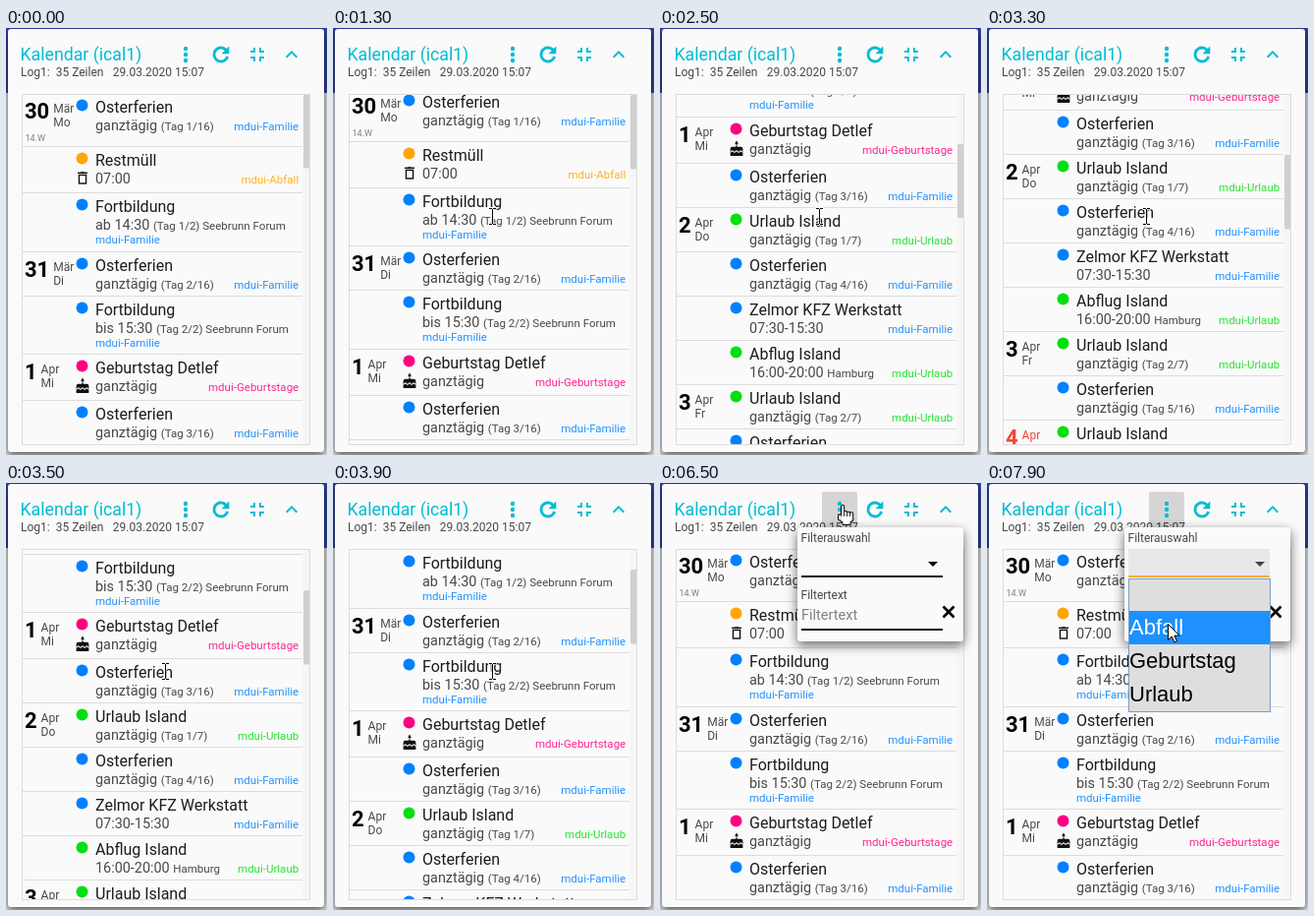
Write an HTML page with a canvas that moves like this. It is 327 px wide and 434 px high and loops after 8 s.

```html
<!DOCTYPE html>
<html lang="de">
<head>
<meta charset="utf-8">
<title>Kalendar</title>
<style>
html, body { margin: 0; width: 100%; height: 100%; overflow: hidden; }
canvas { display: block; width: 327px; height: 434px; }
</style>
</head>
<body>
<canvas id="stage"></canvas>
<script>
const W = 327, H = 434, LOOP = 8000, STEP = 100;
const canvas = document.getElementById('stage');
const ctx = canvas.getContext('2d');
const dpr = window.devicePixelRatio || 1;
canvas.width = W * dpr;
canvas.height = H * dpr;

const CYAN = '#00bcd4', INK = '#1c1c1c', SOFT = '#484848', LINE = '#dcdcdc', PAPER = '#fafafa';
const TAGS = { Familie: '#0080ff', Abfall: '#ffa500', Geburtstage: '#ff0080', Urlaub: '#00e010' };
const LIST = { x: 16, y: 67, w: 294, h: 357 };
const TWO_LINES = 45, WITH_ICON = 47, WITH_WEEK = 54, THREE_LINES = 59.5;

const entry = (title, time, note, tag, more = {}) => ({ title, time, note, tag, h: TWO_LINES, ...more });
const holiday = (n, more) => entry('Osterferien', 'ganztägig', `(Tag ${n}/16)`, 'Familie', more);
const trip = (n, more) => entry('Urlaub Island', 'ganztägig', `(Tag ${n}/7)`, 'Urlaub', more);
const course = (n, time) =>
  entry('Fortbildung', time, `(Tag ${n}/2) Seebrunn Forum`, 'Familie', { h: THREE_LINES, wide: true });

const rows = [
  holiday(1, { day: ['30', 'Mär', 'Mo'], week: '14.W', h: WITH_WEEK }),
  entry('Restmüll', '07:00', '', 'Abfall', { icon: drawBin, h: WITH_ICON }),
  course(1, 'ab 14:30'),
  holiday(2, { day: ['31', 'Mär', 'Di'] }),
  course(2, 'bis 15:30'),
  entry('Geburtstag Detlef', 'ganztägig', '', 'Geburtstage',
    { day: ['1', 'Apr', 'Mi'], icon: drawCake, h: WITH_ICON }),
  holiday(3),
  trip(1, { day: ['2', 'Apr', 'Do'] }),
  holiday(4),
  entry('Zelmor KFZ Werkstatt', '07:30-15:30', '', 'Familie'),
  entry('Abflug Island', '16:00-20:00', 'Hamburg', 'Urlaub'),
  trip(2, { day: ['3', 'Apr', 'Fr'] }),
  holiday(5),
  trip(3, { day: ['4', 'Apr', 'Sa'], red: true })
];

const ease = k => (1 - Math.cos(Math.PI * Math.min(1, Math.max(0, k)))) / 2;

// Every wheel notch scrolls by 100 px.
const DOWN = [1274, 1520, 2420], UP = [3274, 3674, 4320];
function scrollAt(t) {
  const turned = starts => starts.reduce((sum, s) => sum + ease((t - s) / 180), 0);
  return 100 * (turned(DOWN) - turned(UP));
}

const ENTRY = { x: 313, y: 72 };
const MOVES = [
  { from: 400, to: 600, x: 162, y: 191 },
  { from: 4900, to: 5000, x: 164, y: 190 },
  { from: 5000, to: 5700, x: 173, y: 22, bow: 70 },
  { from: 5800, to: 6000, x: 186, y: 22 },
  { from: 6500, to: 6900, x: 275, y: 78 },
  { from: 7400, to: 7900, x: 184, y: 143 }
];
function pointerAt(t) {
  let { x, y } = ENTRY;
  for (const m of MOVES) {
    const k = ease((t - m.from) / (m.to - m.from));
    x += (m.x - x) * k + (m.bow || 0) * Math.sin(Math.PI * k);
    y += (m.y - y) * k;
  }
  return { x: Math.round(x), y: Math.round(y) };
}

function text(str, x, y, size, color, { weight = 400, align = 'left', family = 'Roboto' } = {}) {
  ctx.font = `${weight} ${size}px ${family}, sans-serif`;
  ctx.textAlign = align;
  ctx.fillStyle = color;
  ctx.fillText(str, x, y);
  return ctx.measureText(str).width;
}

function rect(x, y, w, h, color) {
  ctx.fillStyle = color;
  ctx.fillRect(x, y, w, h);
}

function disc(x, y, r, color) {
  ctx.fillStyle = color;
  ctx.beginPath();
  ctx.arc(x, y, r, 0, Math.PI * 2);
  ctx.fill();
}

function panel(x, y, w, h, r, color, shadow) {
  ctx.save();
  if (shadow) {
    ctx.shadowColor = shadow.color;
    ctx.shadowBlur = shadow.blur * dpr;
    ctx.shadowOffsetY = shadow.dy * dpr;
  }
  ctx.fillStyle = color;
  ctx.beginPath();
  ctx.roundRect(x, y, w, h, r);
  ctx.fill();
  ctx.restore();
}

function line(points, width, color) {
  ctx.strokeStyle = color;
  ctx.lineWidth = width;
  ctx.beginPath();
  for (const [x, y] of points) ctx.lineTo(x, y);
  ctx.stroke();
}

function shape(points, color) {
  ctx.fillStyle = color;
  ctx.beginPath();
  for (const [x, y] of points) ctx.lineTo(x, y);
  ctx.closePath();
  ctx.fill();
}

function at(x, y, scale, paint) {
  ctx.save();
  ctx.translate(x, y);
  ctx.scale(scale, scale);
  paint();
  ctx.restore();
}

function drawRefresh() {
  ctx.strokeStyle = CYAN;
  ctx.lineWidth = 2.8;
  ctx.beginPath();
  ctx.arc(0, 0, 7, .29, 5.6);
  ctx.stroke();
  shape([[.5, -.7], [8.3, -.7], [8.3, -8.5]], CYAN);
}

function drawShrink() {
  for (let i = 0; i < 4; i++) {
    rect(-7, -4, 5, 2, CYAN);
    rect(-4, -7, 2, 5, CYAN);
    ctx.rotate(Math.PI / 2);
  }
}

function drawBin() {
  ctx.strokeStyle = '#111';
  ctx.lineWidth = 2;
  ctx.strokeRect(-5, -5, 10, 12);
  rect(-7, -9, 14, 2, '#111');
  rect(-2.5, -10, 5, 1, '#111');
}

function drawCake() {
  disc(0, -8, 2, '#111');
  shape([[-1.7, -9], [0, -12], [1.7, -9]], '#111');
  rect(-1, -5, 2, 3, '#111');
  panel(-9, -3, 18, 13, [3, 3, 1, 1], '#111');
  const icing = Array.from({ length: 19 }, (_, i) => [i - 9, 3.6 - 1.1 * Math.cos((i - 9) * Math.PI / 3)]);
  line(icing, 1.5, PAPER);
}

function drawFrame() {
  rect(0, 0, W, H, '#e0e0e0');
  rect(0, 0, W, 66, '#303f9f');
  panel(2, 1, 322, 430, 3, PAPER, { color: 'rgba(0,0,0,.65)', blur: 9, dy: 3 });
}

function drawHeader(pressed) {
  text('Kalendar (ical1)', 14.5, 33, 17.7, CYAN);
  text('Log1:', 15, 49, 12, SOFT);
  text('35 Zeilen', 50.7, 49, 12, SOFT);
  text('29.03.2020 15:07', 108.8, 49, 12, SOFT);
  if (pressed) panel(165, 9, 36, 36, 2, 'rgba(0,0,0,.15)');
  for (const dy of [-6, 0, 6]) disc(183, 27 + dy, 2.2, CYAN);
  at(219, 27, 1, drawRefresh);
  at(256, 27, 1, drawShrink);
  at(291, 27, 1, () => line([[-5.3, 2.7], [0, -2.6], [5.3, 2.7]], 2, CYAN));
}

function drawTag(name, x, y, align) {
  ctx.globalAlpha = .85;
  text('mdui-' + name, x, y, 11.52, TAGS[name], { align });
  ctx.globalAlpha = 1;
}

function drawRow(row, top) {
  const base = Math.round(top) + 19;
  rect(LIST.x, Math.round(top + row.h) - 1, 286, 1, LINE);
  disc(77.5, base - 7.5, 6, TAGS[row.tag]);
  if (row.icon) at(78, base + 13, .71, row.icon);
  text(row.title, 91, base, 16, INK);
  const w = text(row.time, 91, base + 18, 14.4, SOFT);
  text(row.note, 91 + w + 3.6, base + 18, 11.52, SOFT);
  if (row.wide) drawTag(row.tag, 91, base + 32, 'left');
  else drawTag(row.tag, 298.2, base + 18, 'right');
  if (row.day) {
    const [num, month, name] = row.day;
    const tone = row.red ? '#f44336' : SOFT;
    const x = 23 + text(num, 19, base + 6, 22, row.red ? tone : '#000', { weight: 700 });
    text(month, x, base, 12, tone);
    text(name, x, base + 14, 12, tone);
  }
  if (row.week) text(row.week, 19.5, base + 29, 9, '#808080');
}

function drawList(scroll) {
  const { x, y, w, h } = LIST;
  ctx.save();
  ctx.beginPath();
  ctx.rect(x, y, w, h);
  ctx.clip();
  let top = y - scroll;
  for (const row of rows) {
    if (top < y + h && top + row.h > y) drawRow(row, top);
    top += row.h;
  }
  rect(302, y, 8, h, '#f6f6f6');
  panel(303, y + scroll * .21, 7, 75.5, 2, '#d0d0d0');
  ctx.restore();
  ctx.strokeStyle = LINE;
  ctx.lineWidth = 1;
  ctx.strokeRect(x + .5, y + .5, w - 1, h - 1);
}

function drawPopup(alpha, hover, focus) {
  ctx.save();
  ctx.globalAlpha = alpha;
  panel(140, 45, 169, 116, 3, PAPER, { color: 'rgba(0,0,0,.6)', blur: 12, dy: 4 });
  text('Filterauswahl', 143.5, 60, 12, SOFT);
  if (hover) rect(144, 67, 144, 28, '#e8e8e8');
  rect(144, 94, 144, 2, focus ? '#ffb000' : '#111');
  shape([[273, 80], [283, 80], [278, 85]], focus ? '#444' : '#000');
  text('Filtertext', 143.5, 118, 12, SOFT);
  text('Filtertext', 144, 138.5, 14.5, '#808080');
  rect(144, 148, 144, 2, '#111');
  for (const s of [-1, 1]) line([[294 - 5.5, 131 - 5.5 * s], [294 + 5.5, 131 + 5.5 * s]], 2.6, '#000');
  ctx.restore();
}

function drawOptions(pointerY) {
  const active = Math.max(0, Math.floor((pointerY - 97) / 34));
  rect(144, 97, 145, 136, '#dedede');
  ['', 'Abfall', 'Geburtstag', 'Urlaub'].forEach((label, i) => {
    const y = 96 + i * 34;
    if (i === active) rect(145, y, 143, 34, '#1e90ff');
    text(label, 145, y + 24, 22, i === active ? '#fff' : '#000', { family: '"Liberation Sans"' });
  });
  ctx.strokeStyle = '#7a9cc8';
  ctx.lineWidth = 1;
  ctx.strokeRect(144.5, 97.5, 144, 135);
}

function drawBeam() {
  for (const [grow, color] of [[1, 'rgba(255,255,255,.65)'], [0, '#000']]) {
    const bar = (x, y, w, h) => rect(x - grow, y - grow, w + 2 * grow, h + 2 * grow, color);
    bar(0, -7, 1, 15);
    for (const x of [-3, 1]) for (const y of [-8, 8]) bar(x, y, 3, 1);
  }
}

function drawArrow() {
  const outline = [[.5, .5], [.5, 16.5], [4.3, 13], [6.9, 18.8], [9.4, 17.7], [6.9, 12.1], [12, 12.1], [.5, .5]];
  shape(outline, '#fff');
  line(outline, 1, '#000');
}

function drawHand() {
  for (const [grow, color] of [[1, '#000'], [0, '#fff']]) {
    const part = (x, y, w, h) => panel(x - grow, y - grow, w + 2 * grow, h + 2 * grow, 1.5 + grow, color);
    part(-1, 1, 2.2, 13);
    for (let i = 1; i < 4; i++) part(3 * i - 1, 6.5 + i * .6, 2.2, 8);
    part(-4, 10.5, 2.6, 5);
    part(-1.8, 12, 11.2, 5);
    part(.2, 14, 7.5, 6);
  }
}

function drawPointer({ x, y }, t) {
  const onMenu = Math.abs(x - 183) < 18 && Math.abs(y - 27) < 18;
  const onText = t >= 600 && t <= 5000;
  at(x, y, 1, onText ? drawBeam : onMenu ? drawHand : drawArrow);
}

function draw(t) {
  const pointer = pointerAt(t);
  ctx.setTransform(dpr, 0, 0, dpr, 0, 0);
  drawFrame();
  drawHeader(t >= 6200);
  drawList(scrollAt(t));
  if (t > 6200) drawPopup(ease((t - 6200) / 300), t >= 6900, t >= 7000);
  if (t >= 7100) drawOptions(pointer.y);
  if (t >= 400) drawPointer(pointer, t);
}

const start = performance.now();
function tick() {
  const t = (performance.now() - start) % LOOP;
  draw(Math.floor(t / STEP) * STEP);
  requestAnimationFrame(tick);
}
tick();
</script>
</body>
</html>
```
